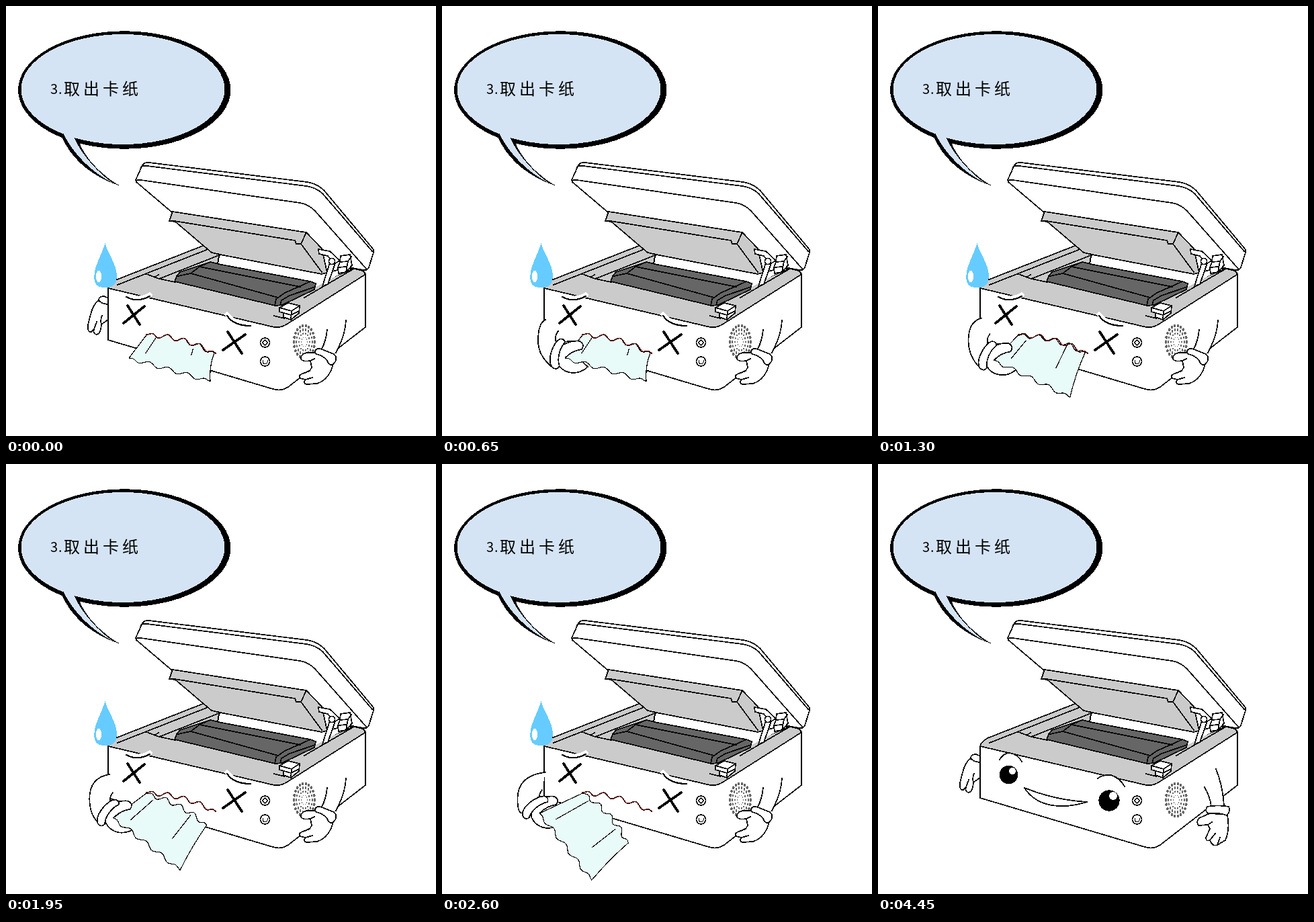
An HTML page for the animation above (5.25 s loop, 640x640 px).

```html
<!DOCTYPE html>
<html lang="zh">
<head>
<meta charset="utf-8">
<title>取出卡纸</title>
<style>
html, body { margin: 0; height: 100%; overflow: hidden; background: #fff; }
svg { display: block; width: 100vw; height: 100vh; shape-rendering: crispEdges; }
path, circle, ellipse { stroke-linecap: round; stroke-linejoin: round; }
.w, .g, .d, .n { stroke: #000; stroke-width: 1.7; }
.w { fill: #fff; }
.g { fill: #cbcbcb; }
.d { fill: #666; }
.n { fill: none; }
.fill { fill: #fff; }
.thin { stroke-width: 1; }
.sheet { fill: #e9fbf9; stroke: #000; stroke-width: 1.2; }
.mouth { fill: none; stroke: #4a0808; stroke-width: 1.7; }
.cross { fill: none; stroke: #000; stroke-width: 3.8; }
.brow { fill: none; stroke: #000; stroke-width: 2.2; }
.halo { fill: none; stroke: #fff; stroke-width: 7; }
text { font: 24px "Noto Sans CJK SC", "Noto Sans CJK", sans-serif; }
.num { font-size: 20px; }
</style>
</head>
<body>
<svg viewBox="0 0 640 640">
  <g id="bubble">
    <ellipse cx="176.2" cy="125" rx="158.2" ry="87.7"/>
    <path d="M80 187C92 221 120 251 170 268C137 249 115 223 106 196Z"/>
    <ellipse cx="174" cy="124" rx="151.5" ry="82" fill="#d5e4f5"/>
    <path d="M83 185C97 216 123 245 160 264C136 248 112 220 101 195Z" fill="#d5e4f5"/>
    <text class="num" y="131" x="66 78">3.</text>
    <text y="132" x="86 115 144 173">取出卡纸</text>
  </g>

  <g id="restArm">
    <path class="w" d="M153 435L146 432Q138 432 138 438Q130 443 126 459L122 475Q121 486 127 485L131 481Q129 488 135 489Q141 488 142 474L153 466Z"/>
    <path class="n" d="M138 438Q142 443 151 444M131 481L135 470M143 461Q140 467 142 474"/>
  </g>

  <g id="base">
    <path class="w" d="M152 420L163 409L303 353L512 391L530 394Q535 395 535 400V478L420 567Q409 574 397 570L152 497Z"/>
    <path class="g" d="M152 420Q153 414 163 408L303 353L320 367L318 373L316 383L461 413L508 395L518 391L530 394Q535 396 534 400L419 473Q407 481 395 477Z"/>
    <path class="fill" d="M318 372L330 371L471 399L512 391L461 418L458 411L316 384Z"/>
    <path class="n" d="M166 415L311 358M209 399L228 406L317 371L315 383M222 403L227 400M228 406L252 411M444 434L518 391"/>
  </g>

  <g id="cartridge">
    <path class="d" d="M251 410L254 402L259 396L304 381L316 384L453 410L461 413L459 422L411 445L401 446Z"/>
    <path class="n" d="M256 402L275 398L288 388L304 381M275 398L405 434M288 388L438 418M400 446L402 436L415 427L453 410M408 445L410 438L422 431L460 418"/>
  </g>

  <g id="lid">
    <path class="w" d="M194 262L193 259L202 239Q205 232 213 233L448 262Q462 264 473 274L545 360Q548 363 547 367L540 389Q538 394 532 393L510 389L470 399L324 371L247 307Z"/>
    <path class="n" d="M194 260Q196 258 201 259L437 293Q450 295 460 305L537 392M201 240Q204 237 210 238L447 268Q461 270 471 279L545 365"/>
    <path class="g" d="M248 306L447 337L470 361L478 397L470 399L324 371L306 367L252 321L243 320Z"/>
    <path class="n" d="M243 320L251 320L430 349L432 354L439 354L447 337M439 354L470 396"/>
  </g>

  <g id="hinge">
    <path class="w" d="M482 382L471 417L479 414L490 383Z"/>
    <path class="w" d="M465 362L482 365L497 379L488 384L479 372L466 369Z"/>
    <circle class="w" cx="485" cy="380" r="4.5"/>
    <path class="w" d="M497 381L498 372L512 370L515 386L506 396L495 398L494 389Z"/>
    <path class="n" d="M497 381L509 380L506 396M509 380L514 373M495 389L506 388"/>
    <path class="w" d="M407 449L420 442L437 446L436 457L424 467L413 463L413 457L407 455Z"/>
    <path class="n" d="M407 449L425 454L437 446M425 454L424 467M407 455L424 460L436 454M399 461L414 465"/>
  </g>

  <g id="panel">
    <g id="speaker" fill="#666"></g>
    <circle class="w" cx="385.5" cy="501" r="7"/>
    <path class="n thin" d="M385.5 497l4 4l-4 4l-4 -4Z"/>
    <circle class="w" cx="385.5" cy="529" r="7"/>
    <path class="n thin" d="M382 527Q382 533 386 533Q390 532 389 527"/>
  </g>

  <g id="sad">
    <path class="cross" d="M175 472L206 447M181 446L199 474M323 512L356 489M330 485L351 517"/>
    <path class="halo" d="M179 431Q196 440 214 430M329 459Q339 474 364 474"/>
    <path class="brow" d="M179 433Q196 442 214 432M329 461Q339 476 364 476"/>
    <path fill="#6cf" d="M147.5 353C152 370 165 384 165 403C165 415 158 420 148 419C137 420 131 415 131 403C131 386 143 370 147.5 353Z"/>
    <ellipse class="fill" cx="138" cy="402.5" rx="4" ry="9"/>
  </g>

  <g id="happy">
    <path class="fill" d="M180 441Q196 418 215 443ZM327 468Q346 454 367 480Z"/>
    <path class="n" d="M181 440Q187 430 196 430Q208 432 214 443M327 468Q335 462 347 463Q360 467 367 480"/>
    <circle cx="194.5" cy="462.5" r="13.7"/><circle class="fill" cx="200" cy="457" r="5"/>
    <circle cx="344" cy="501" r="15.7"/><circle class="fill" cx="350" cy="494" r="6"/>
    <path class="w" d="M218 482Q262 500 311 503C276 514 237 512 218 482Z"/>
    <path class="fill" d="M503 453Q514 478 515 510L496 511Q495 496 486 481Z"/>
    <path class="n" d="M503 454Q513 478 515 509M486 481Q494 494 496 510"/>
    <path class="w" d="M494 520L478 527Q473 532 477 538L491 537L494 543L488 556Q488 562 494 560Q498 570 505 567L517 560Q524 545 520 522Z"/>
    <path class="n" d="M494 560L502 550M505 567L509 556M491 537L497 533"/>
    <path class="w" d="M490 510Q486 516 491 520Q505 518 519 523Q525 517 522 510Q505 507 490 510Z"/>
  </g>

  <g id="propArm">
    <path class="fill" d="M478 482Q475 501 469 514L491 518Q505 491 506 467Z"/>
    <path class="n" d="M478 482Q476 500 469 512M506 468Q505 490 491 516"/>
    <path class="w" d="M463 516L447 516Q438 519 439 525Q441 530 453 528L455 538L452 543L442 547Q435 549 437 554L446 556Q441 561 447 563L463 562Q481 556 487 533Z"/>
    <path class="n" d="M446 556L456 553M453 528L459 525"/>
    <path class="w" d="M460 514Q462 508 470 511L488 518Q495 525 488 532Q484 536 480 532Q477 522 462 518Q459 517 460 514Z"/>
  </g>

  <g id="pullArm">
    <path id="armFill" class="fill"/>
    <path id="armEdge" class="n"/>
    <path id="palm" class="w" d="M-2 -24Q-12 -12 -12 6Q-5 21 12 22Q25 22 34 13L22 2L26 -20Q15 -27 -2 -24Z"/>
  </g>
  <path id="sheet" class="sheet"/>
  <g id="grip">
    <path id="thumb" class="w" d="M-2 -20Q12 -27 22 -25Q30 -21 25 -13Q11 -11 1 -1"/>
    <path id="cuff" class="w" d="M-22 3C-16 -10 14 -12 21 -5Q25 0 20 4C8 0 -8 4 -15 11Q-23 12 -22 3Z"/>
  </g>
  <path id="lip" class="mouth"/>
</svg>
<script>
const $ = id => document.getElementById(id);
const show = (id, on) => { $(id).style.display = on ? "" : "none"; };
const set = (id, name, value) => $(id).setAttribute(name, value);
const rad = Math.PI / 180;

// Rippled line from a to b; a positive bow bulges it to the left of travel.
function wave([ax, ay], [bx, by], ripples, height, bow) {
  const dx = bx - ax, dy = by - ay, len = Math.hypot(dx, dy), points = [];
  for (let i = 0; i <= 48; i++) {
    const t = i / 48, taper = Math.min(1, 10 * t, 10 * (1 - t));
    const h = height * taper * Math.sin(2 * Math.PI * ripples * t) + bow * Math.sin(Math.PI * t);
    points.push(`${(ax + dx * t + dy / len * h).toFixed(1)} ${(ay + dy * t - dx / len * h).toFixed(1)}`);
  }
  return points.join("L");
}

function speaker() {
  let dots = "";
  for (let ring = 0; ring < 4; ring++) {
    const n = 22 - 4 * ring, r = 15.5 - 3.7 * ring, size = 2.1 - .45 * ring;
    for (let i = 0; i < n; i++) {
      const a = i / n * 2 * Math.PI;
      dots += `<ellipse cx="${444 + r * Math.cos(a)}" cy="${500 + r * 1.56 * Math.sin(a)}" rx="${size * .85}" ry="${size * 1.2}"/>`;
    }
  }
  return dots;
}

// The paper hangs from its held corner, turning as more of it comes out.
function drawSheet(x, y, angle, pull) {
  const left = 41 + 8 * pull, right = 42 + 35 * Math.min(1, .8 * pull);
  const a = [16, -left], b = [120 - Math.min(4, 3 * pull), -right], c = [126, 0];
  set("sheet", "transform", `translate(${x} ${y}) rotate(${angle})`);
  set("sheet", "d", `M${wave(a, b, 4.3, 3.5, 6)}Q118 ${-right / 2} ${c}L${wave(c, [0, 0], 4.3, -3, 0)}Z` +
    `M30 ${2 - left}L22 -14M88 ${3 - right}L88 -30`);
}

function drawArm(x, y, angle, pull) {
  const turn = angle - 81, cx = x - 12 + 1.2 * pull, cy = y - 7 - pull;
  const ux = 21 * Math.cos(turn * rad), uy = 21 * Math.sin(turn * rad);
  const hx = cx + ux, hy = cy + uy, side = 143 - 8.5 * pull, top = 467 - 2.3 * pull;
  const outer = `M154 ${top}Q${side} ${top + 5} ${side} 498Q${side} 520 ${cx - ux} ${cy - uy}`;
  const fold = `${hx - 10} ${hy + 3}Q${hx - 13} ${hy - 7} ${hx - 7} ${hy - 14}`;
  set("armFill", "d", `${outer}L${hx} ${hy}L${fold}Z`);
  set("armEdge", "d", `${outer}M${fold}`);
  for (const id of ["palm", "thumb"]) set(id, "transform", `translate(${x} ${y})`);
  set("cuff", "transform", `translate(${cx} ${cy}) rotate(${turn})`);
}

$("speaker").innerHTML = speaker();
set("lip", "d", "M" + wave([209, 489], [312, 517], 4.3, 3.5, 6));

const step = 650, loop = 5250;
const pulls = [0, 0, 1, 2.2, 3.6];
let current = -1;

function draw(time) {
  const i = Math.min(pulls.length, Math.floor(time % loop / step));
  if (i === current) return;
  current = i;
  const jammed = i < pulls.length, pulling = jammed && i > 0;
  for (const id of ["sad", "propArm", "lip", "sheet"]) show(id, jammed);
  for (const id of ["pullArm", "grip"]) show(id, pulling);
  show("restArm", !pulling);
  show("happy", !jammed);
  if (jammed) {
    const pull = pulls[i], angle = 16 + 10 * pull;
    const x = 183 - 10.5 * pull, y = 524 + 5 * pull - 1.7 * pull * pull;
    drawSheet(x, y, angle, pull);
    drawArm(x, y, angle, pull);
  }
}

const start = performance.now();
function tick() {
  draw(performance.now() - start);
  requestAnimationFrame(tick);
}
tick();
</script>
</body>
</html>
```
